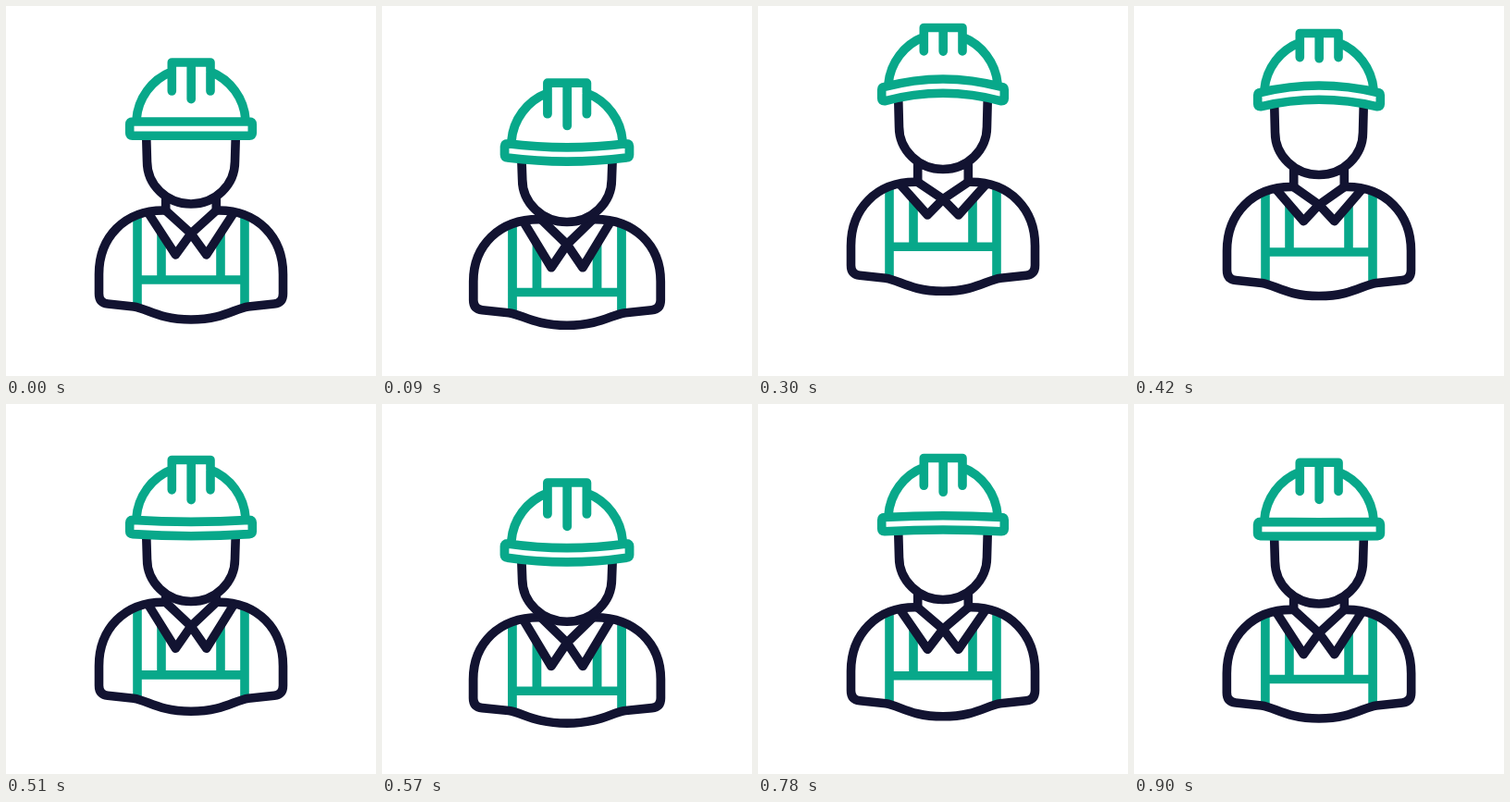
Recreate the animation shown at these times as an HTML page. Size 400 px wide and 400 px high, loop 0.93 s.

```html
<!DOCTYPE html>
<html lang="en">
<head>
<meta charset="utf-8">
<title>Jumping builder</title>
<style>
  html, body { margin: 0; height: 100%; overflow: hidden; background: #fff; }
  svg { display: block; width: 100%; height: 100%; }
  path { fill: none; stroke: #121331; stroke-width: 9.6; stroke-linejoin: round; }
  .green { stroke: #08a88a; }
  .round { stroke-linecap: round; }
</style>
</head>
<body>
<svg viewBox="0 0 400 400">
  <g id="figure">
    <path id="straps" class="green"/>
    <path id="torso" class="round"/>
    <path id="collar" class="round"/>
    <path id="face"/>
    <path id="helmet" class="green round"/>
  </g>
</svg>
<script>
const LOOP = 930, STEP = 30;

const clamp = u => Math.min(1, Math.max(0, u));
const ease = (t, from, to) => (1 - Math.cos(Math.PI * clamp((t - from) / (to - from)))) / 2;

// Crouch before the jump, recover after landing, then wobble once
function ground(t, rest, dip, wobble, lead) {
  const crouch = ease(t, 0, 110) - ease(t + lead, 600, 790);
  return rest + dip * crouch - wobble * Math.sin(2 * Math.PI * clamp((t - 710) / 220));
}

// Free flight around the highest point
const flight = (t, apex, peakTime, gravity) => apex + gravity * (t - peakTime) ** 2;

const set = (id, d) => document.getElementById(id).setAttribute('d', d);

function draw(t) {
  const top = Math.min(ground(t, 61, 24, 3, 0), flight(t, 21, 342, .0014));
  const bottom = Math.min(ground(t, 339, 6.8, 1.3, 70), flight(t, 307.5, 332, .00078));
  const stretch = 1 - Math.max(0, top - 61) * .0013;
  const y = v => bottom + (v - 339) * stretch;
  const h = v => top + v;

  // Soft parts follow the distance between head and shoulders
  const neck = y(221), slack = top - neck + 160;
  const sag = Math.max(0, slack) * .33, pull = Math.max(0, -slack) * 1.25;
  const bend = sag - pull;

  const drop = 48 + sag - 1.45 * pull;
  const tip = neck + drop, cross = neck + drop * .52;
  const bib = bottom - 43 + 1.75 * sag - .6 * pull;
  const strapTop = neck + drop * .5;

  document.getElementById('figure').setAttribute('transform',
    `translate(200) scale(${1 + (1 - stretch) * .6} 1) translate(-200)`);

  set('straps', `M142 ${y(228)}V${y(325)}M258 ${y(228)}V${y(325)}
    M142 ${bib}H258M168 ${strapTop}V${bib}M232 ${strapTop}V${bib}`);

  set('torso', `M172 ${neck}H170C128 ${neck} 100.5 ${y(250)} 100.5 ${y(290)}
    V${y(311)}Q100.5 ${y(321)} 110 ${y(322)}L138 ${y(325)}
    C153 ${y(327)} 165 ${bottom} 200 ${bottom}S247 ${y(327)} 262 ${y(325)}
    L290 ${y(322)}Q299.5 ${y(321)} 299.5 ${y(311)}V${y(290)}
    C299.5 ${y(250)} 272 ${neck} 230 ${neck}H228`);

  set('collar', `M154 ${neck + 3}L183.3 ${tip}L200 ${cross}L227.5 ${neck}
    M246 ${neck + 3}L216.7 ${tip}L200 ${cross}L172.5 ${neck}`);

  const chin = h(153 - (1 - stretch) * 90), jaw = chin - 46;
  const faceTop = h(80 + bend * .47), neckTop = chin - 9, neckEnd = Math.max(neck, neckTop);
  set('face', `M151.7 ${faceTop}L152.5 ${jaw}A47.5 46 0 0 0 247.5 ${jaw}L248.3 ${faceTop}
    M172.7 ${neckTop}V${neckEnd}M227.3 ${neckTop}V${neckEnd}`);

  const rib = h(31 + .65 * bend), midRib = h(39.7 + 1.65 * bend);
  const shell = h(10 + .25 * sag), rim = h(62 + .2 * bend);
  const brim = h(64 + .4 * sag), edge = brim + 15.3;
  set('helmet', `M141 ${rim}A60.5 60.5 0 0 1 179 ${shell}
    M259 ${rim}A60.5 60.5 0 0 0 221 ${shell}
    M179.3 ${rib}V${h(0)}H221V${rib}M200.2 ${h(3)}V${midRib}
    M133.7 ${brim + 3}q0 -3 3 -3Q200 ${brim + 2 * bend} 263.3 ${brim}q3 0 3 3
    V${edge - 3}q0 3 -3 3Q200 ${edge + 2 * bend} 136.7 ${edge}q-3 0 -3 -3Z`);
}

function frame() {
  const t = performance.now() % LOOP;
  draw(Math.floor(t / STEP) * STEP);
  requestAnimationFrame(frame);
}
frame();
</script>
</body>
</html>
```
